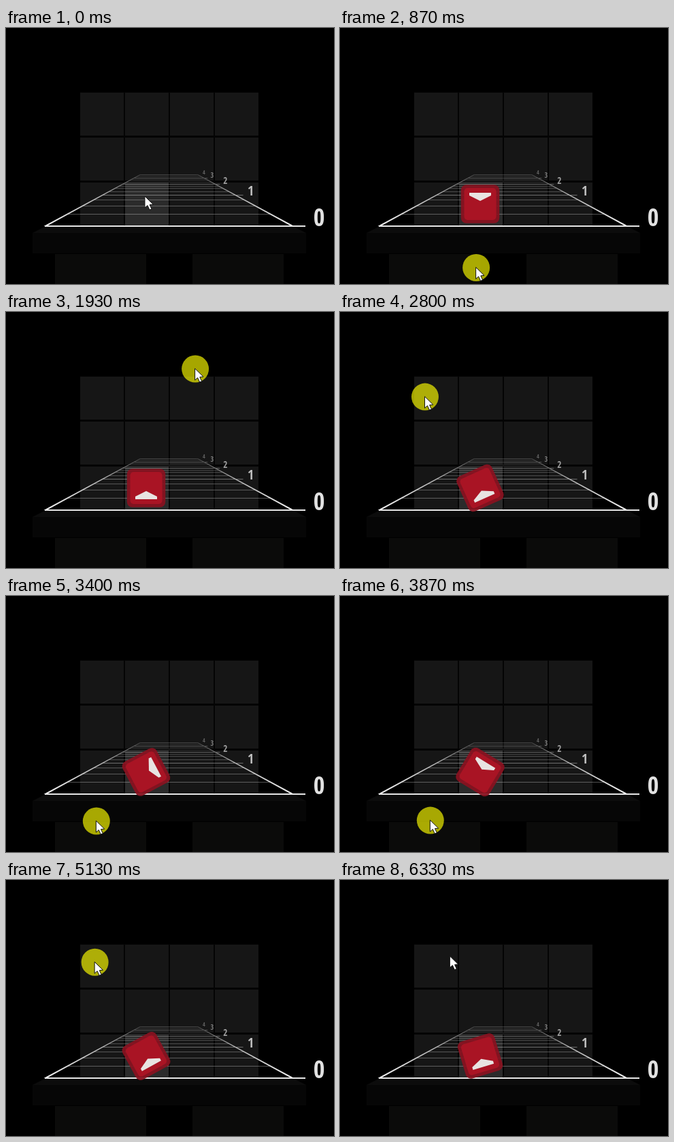
An HTML page with a canvas that plays this animation: 482 by 376 pixels, repeating every 6540 ms.

```html
<!DOCTYPE html>
<html lang="en">
<head>
<meta charset="utf-8">
<title>Note rotation</title>
<style>
  html, body { margin: 0; width: 100%; height: 100%; overflow: hidden; background: #000; }
  canvas { display: block; }
</style>
</head>
<body>
<canvas id="stage" width="482" height="376"></canvas>
<script>
const ctx = document.getElementById('stage').getContext('2d');
const LOOP = 6540;
const RATE = 0.015;
const LAST = 95;
const PRESS = 60, RELEASE = 6150;
const FREE_FROM = 4400;        // before this the note snaps to 45 degrees
const LAG = 130;               // time a snapped turn takes
const NOTE = { x: 206, y: 258.5 };
const ROAD = { x: 239.5, horizon: 192.6, depth: 98.4, half: 181.5, beat: 0.848 };

// Turning points of the pointer's swing around the note.
const SWINGS = [
  { t: 0, angle: 172, reach: 193 },
  { t: 870, angle: 183.6, reach: 193 },
  { t: 2200, angle: 403.5, reach: 193 },
  { t: 3000, angle: 316, reach: 156 },
  { t: 3640, angle: 185, reach: 155 },
  { t: 4330, angle: 352.7, reach: 134 },
  { t: 4860, angle: 305, reach: 160 },
  { t: 5700, angle: 415, reach: 165 },
  { t: 5950, angle: 315, reach: 154 },
  { t: 6130, angle: 343.2, reach: 154 }
];

const radians = degrees => degrees * Math.PI / 180;
const clamp = u => Math.min(1, Math.max(0, u));
const mix = (a, b, u) => a + (b - a) * u;
const ease = u => (1 - Math.cos(Math.PI * clamp(u))) / 2;

function swing(t, key) {
  const next = Math.max(1, SWINGS.findIndex(s => s.t >= t));
  if (t > SWINGS.at(-1).t) return SWINGS.at(-1)[key];
  const a = SWINGS[next - 1], b = SWINGS[next];
  return mix(a[key], b[key], ease((t - a.t) / (b.t - a.t)));
}

// The swing is tight below the note and wide above it.
function pointerAt(t) {
  const angle = radians(swing(t, 'angle'));
  const height = (1 + Math.cos(angle)) / 2;
  const orbit = mix(93.5, swing(t, 'reach'), height);
  const r = mix(-11, orbit, ease((t - 70) / 500));
  return { x: NOTE.x + Math.sin(angle) * r, y: NOTE.y - Math.cos(angle) * r };
}

function snappedAngle(t) {
  const samples = 13;
  let sum = 0;
  for (let i = 0; i < samples; i++) {
    const past = Math.max(0, t - LAG * i / samples);
    sum += 45 * Math.round(swing(past, 'angle') / 45);
  }
  return sum / samples;
}

const noteAngle = t =>
  mix(snappedAngle(t), swing(t, 'angle'), clamp((t - FREE_FROM) / LAG));

function polygon(points, fill) {
  ctx.beginPath();
  points.forEach(([x, y]) => ctx.lineTo(x, y));
  ctx.closePath();
  ctx.fillStyle = fill;
  ctx.fill();
}

function rect(x, y, w, h, fill) {
  ctx.fillStyle = fill;
  ctx.fillRect(x, y, w, h);
}

function drawGrid() {
  rect(109, 94, 262, 197, '#040404');
  for (let row = 0; row < 3; row++) {
    for (let col = 0; col < 4; col++) {
      const chosen = row === 2 && col === 1;
      rect(109 + col * 66, 95 + row * 66, 64, 63, chosen ? '#2b2b2b' : '#161616');
    }
  }
}

function drawPlatform() {
  polygon([[57, 292], [423, 292], [441, 301], [39, 301]], '#0c0c0c');
  rect(39, 301, 402, 30, '#060606');
  rect(72, 332, 134, 44, '#0b0b0a');
  rect(274, 332, 134, 44, '#0b0b0a');
}

function drawRoad() {
  const { x, horizon, depth, half, beat } = ROAD;
  for (let q = 16; q >= 1; q--) {
    const z = 1 + beat * q / 4, whole = q % 4 === 0;
    const reach = whole && q < 16 ? 1.11 : 1;
    const alpha = whole ? 0.5 * (1 - q / 28) : 0.38 * (1 - q / 17);
    rect(x - half / z, Math.round(horizon + depth / z - 0.5), half / z * (1 + reach), 1,
      `rgba(225,225,225,${alpha})`);
  }
  const fade = ctx.createLinearGradient(0, 291, 0, 215);
  fade.addColorStop(0, '#f4f4f4');
  fade.addColorStop(0.6, '#b4b4b4');
  fade.addColorStop(1, '#444');
  for (const side of [-1, 1]) {
    polygon([[x + side * 184, 291], [x + side * 179.5, 291],
      [x + side * 40.5, 215], [x + side * 42.5, 215]], fade);
  }
  rect(57, 290, 383, 2, '#e6e6e6');
}

function drawLabels() {
  ctx.textAlign = 'center';
  for (let n = 0; n < 5; n++) {
    const z = 1 + ROAD.beat * n, size = 36 / z;
    ctx.font = `bold condensed ${size}px "Open Sans Condensed", "Open Sans", sans-serif`;
    ctx.fillStyle = `rgba(225,225,225,${1 - 0.16 * n})`;
    ctx.fillText(n, 241 + 219 / z, ROAD.horizon + 86 / z + size * 0.357);
  }
}

function roundedSquare(size, radius, fill) {
  ctx.beginPath();
  ctx.roundRect(-size / 2, -size / 2, size, size, radius);
  ctx.fillStyle = fill;
  ctx.fill();
}

function drawNote(angle) {
  ctx.save();
  ctx.translate(NOTE.x, NOTE.y);
  ctx.rotate(radians(angle));
  roundedSquare(56.5, 8, 'rgba(138,18,32,0.92)');
  roundedSquare(47, 5, '#a91424');
  polygon([[-16, 16.5], [-16, 12.5], [0, 4.5], [16, 12.5], [16, 16.5]], '#e8e4e2');
  ctx.restore();
}

function drawPointer({ x, y }, press) {
  ctx.beginPath();
  ctx.arc(x, y, 20, 0, Math.PI * 2);
  ctx.fillStyle = `rgba(255,255,0,${0.65 * press})`;
  ctx.fill();
  ctx.save();
  ctx.translate(x - 0.5, y - 0.5);
  polygon([[0, 0], [0, 17], [4, 13.5], [7, 20], [10, 18.7], [7.2, 12.5], [12.3, 12]], '#fff');
  ctx.strokeStyle = '#111';
  ctx.lineWidth = 1;
  ctx.stroke();
  ctx.restore();
}

function draw(t) {
  const placed = t >= PRESS;
  rect(0, 0, 482, 376, '#000');
  drawGrid();
  drawPlatform();
  drawRoad();
  drawLabels();
  if (placed) drawNote(noteAngle(t));
  drawPointer(pointerAt(t), placed ? clamp(1 - (t - RELEASE) / 170) : 0);
}

function tick() {
  const t = performance.now() % LOOP;
  draw(Math.min(LAST, Math.floor((t + 4) * RATE)) / RATE);
  requestAnimationFrame(tick);
}
tick();
</script>
</body>
</html>
```
